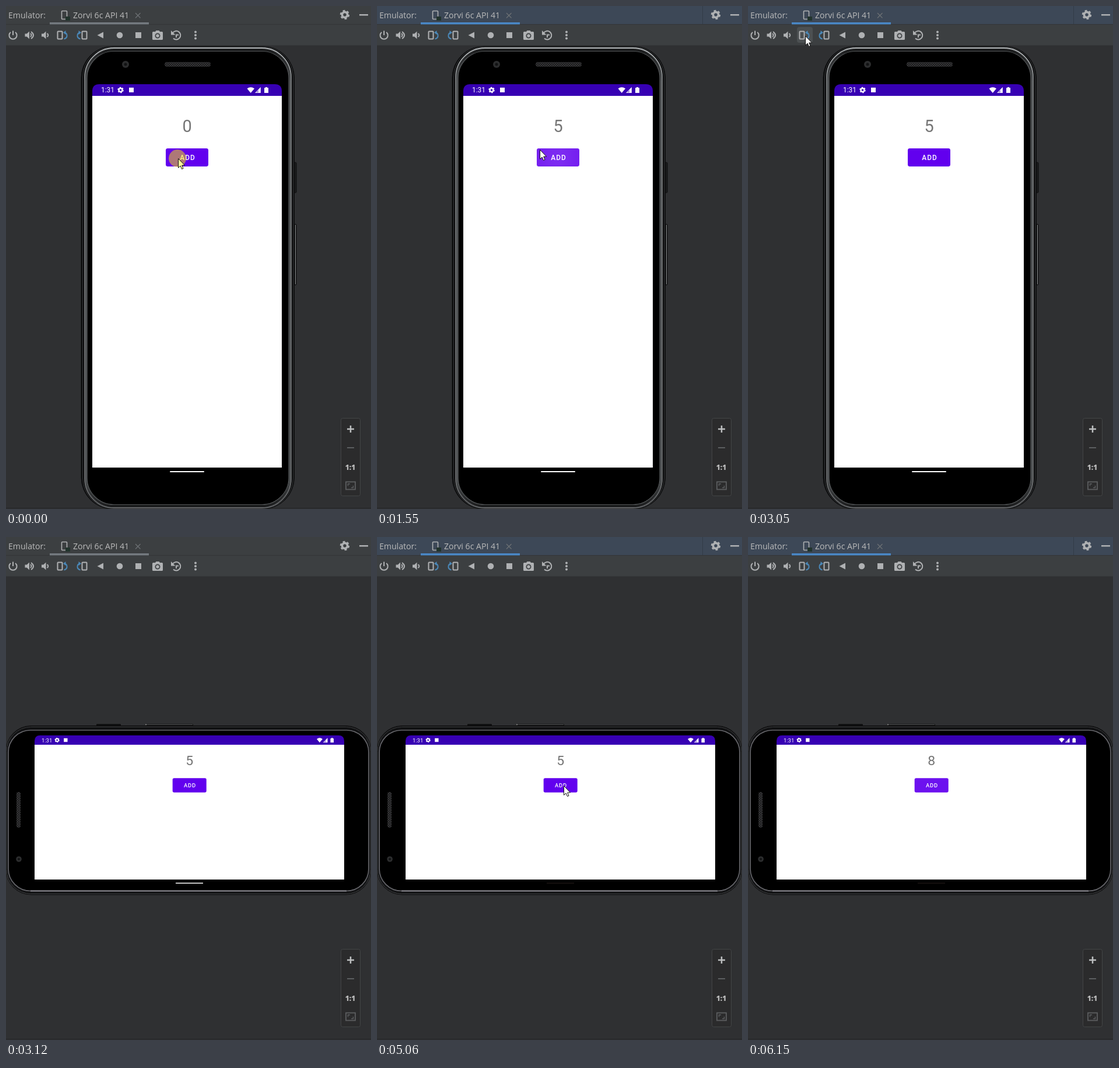
Animation of 626 by 862 pixels, one loop 6.34 s. Source, as an HTML page:

```html
<!DOCTYPE html>
<html lang="en">
<head>
<meta charset="utf-8">
<title>Counter app in an emulator</title>
<style>
  html, body { margin: 0; width: 100%; height: 100%; overflow: hidden; background: #2f3032; }
  svg { display: block; width: 626px; height: 862px; }
  .ui { font: 14.1px "Open Sans", "Noto Sans", sans-serif; fill: #bbb; }
  .app { font-family: Roboto, sans-serif; }
  .line { fill: none; stroke: #afb1b3; stroke-width: 2; }
  .blue { fill: none; stroke: #4a88b8; stroke-width: 2; }
  .icon { fill: #afb1b3; }
</style>
</head>
<body>
<svg viewBox="0 0 626 862">
  <defs>
    <g id="gear" fill="none" stroke="currentColor">
      <circle r="4.6" stroke-width="3.6"/>
      <circle r="6.9" stroke-width="2.6" stroke-dasharray="3.8 3.43"/>
    </g>
    <g id="leftIcons" fill="#fff">
      <text font-size="11.9">1:31</text>
      <use href="#gear" color="#fff" transform="translate(33.5 -4.3) scale(.64)"/>
      <rect x="48" y="-8.4" width="8" height="8"/>
    </g>
    <g id="rightIcons" fill="#fff">
      <path d="M-36.5-2.4Q-30.3-7.3-24-2.4L-30.3 5Z"/>
      <path d="M-13.2-5V5H-23Z"/>
      <path d="M-17-.6V4.3H-21.6Z" fill="#3700b3" opacity=".45"/>
      <path d="M-7-3.8H-5V-5H-2V-3.8H0V5H-7Z"/>
    </g>
    <g id="turn">
      <rect x="-8.5" y="-6.5" width="8" height="13" rx="1" class="line"/>
      <path d="M2.5 6.5Q8 5 7.5 0Q7-4 3.5-4.3" class="blue"/>
      <path d="M5.5-8V-.8L1-4.4Z" fill="#4a88b8"/>
    </g>
    <linearGradient id="metal" x1="0" y1="0" x2="0" y2="1">
      <stop offset="0" stop-color="#b4b8ba"/><stop offset=".07" stop-color="#7c7f81"/>
      <stop offset="1" stop-color="#66686a"/>
    </linearGradient>
    <linearGradient id="bevel" x1="0" y1="0" x2="0" y2="1">
      <stop offset="0" stop-color="#1c1d1e"/><stop offset=".07" stop-color="#4c4f51"/>
      <stop offset=".94" stop-color="#4c4f51"/><stop offset="1" stop-color="#1c1d1e"/>
    </linearGradient>
    <radialGradient id="glow" gradientUnits="userSpaceOnUse" cx="0" cy="44" r="42">
      <stop offset=".2" stop-color="#fff" stop-opacity=".62"/>
      <stop offset="1" stop-color="#fff" stop-opacity=".28"/>
    </radialGradient>
    <pattern id="mesh" width="4" height="4" patternUnits="userSpaceOnUse">
      <rect width="4" height="4" fill="#1a1a1b"/>
      <path d="M0 4L4 0M0 0L4 4" stroke="#3e3e3f" stroke-width=".8"/>
    </pattern>
  </defs>

  <rect width="626" height="862" fill="#2f3032"/>
  <rect y="860" width="626" height="1" fill="#252627"/>
  <g id="phones"></g>

  <!-- tool window header -->
  <rect width="626" height="67" fill="#3c3f41"/>
  <rect id="title" width="626" height="31"/>
  <path d="M0 31.5H626M0 67.5H626" stroke="#333537"/>
  <path id="split" d="M558.5 0V31" stroke="#333c47"/>
  <rect id="tabLine" x="75" y="28" width="170" height="3.5"/>
  <text x="4" y="21" class="ui">Emulator:</text>
  <text x="115" y="21" class="ui">Zorvi 6c API 41</text>
  <rect x="95.5" y="8.5" width="9" height="14" rx="1" class="line" style="stroke-width:1.6"/>
  <rect x="102" y="18" width="8" height="7" fill="#22342d"/>
  <path d="M222 12L230.5 20.5M230.5 12L222 20.5" stroke="#6e7275" stroke-width="1.2"/>
  <use href="#gear" color="#afb1b3" transform="translate(581 15)"/>
  <rect x="606" y="14" width="15" height="2.5" class="icon"/>

  <!-- toolbar -->
  <rect id="hover" y="36" width="27" height="27" rx="4" fill="#4c5052"/>
  <path d="M8 45A6.6 6.6 0 1 0 16 45M12 42.5V50" class="line"/>
  <g id="speakers"></g>
  <use href="#turn" x="97" y="50"/>
  <use href="#turn" transform="translate(130 50) scale(-1 1)"/>
  <path d="M156.5 50L167 44.5V55.5Z" class="icon"/>
  <circle cx="195" cy="50" r="5.3" class="icon"/>
  <rect x="222" y="45" width="10" height="10" class="icon"/>
  <path d="M252.5 44H256L257.500 42H262.5L264 44H267.5Q269 44 269 45.5V56.5Q269 58 267.5 58H252.5Q251 58 251 56.5V45.5Q251 44 252.5 44Z" class="icon"/>
  <circle cx="260" cy="51" r="3.6" fill="#afb1b3" stroke="#3c3f41" stroke-width="1.7"/>
  <path d="M286 46A7.3 7.3 0 1 1 287 55.5M292 54V49.5H296" class="line"/>
  <path d="M283 42V49.5H290.5Z" class="icon"/>
  <g class="icon"><circle cx="325" cy="44.5" r="2"/><circle cx="325" cy="50" r="2"/><circle cx="325" cy="55.5" r="2"/></g>

  <!-- zoom panel -->
  <rect x="574.5" y="706.5" width="33" height="133" rx="3" fill="#2b2b2c" stroke="#434546"/>
  <path d="M585 725H597M591 719V731" stroke="#bdbfc0" stroke-width="2.5"/>
  <path d="M585 757H597" stroke="#5c5e60" stroke-width="2"/>
  <text x="590.5" y="794.5" text-anchor="middle" class="ui" style="font-size:12px;font-weight:800">1:1</text>
  <g fill="none" stroke="#5c5e60"><rect x="583" y="815.5" width="16" height="13" stroke-width="1.8"/>
    <path d="M586.5 822.5V819H590M592 825.5H595.5V822" stroke-width="1.4"/></g>

  <g id="pointer">
    <circle id="spot" r="15" fill="rgb(250,240,0)" opacity=".5" cx="-1"/>
    <path id="arrow" d="M.5.5V16.3L4.1 13L6.5 18.5L9 17.4L6.7 12H11.6Z" stroke="#111"/>
  </g>
</svg>
<script>
const LOOP = 6340, STEP = 200 / 3, TURN = 3120;
const $ = id => document.getElementById(id);

// x, y, right, bottom, radius
const box = (x, y, r, b, rad, style) =>
  `<rect x="${x}" y="${y}" width="${r - x}" height="${b - y}" rx="${rad}" ${style}/>`;
const edge = (color, w = 1, fill = 'none') => `fill="${fill}" stroke="${color}" stroke-width="${w}"`;

function screen({ id, x, y, r, b, bar, k, cx, base, time, tray }) {
  const rad = 12 * k;
  const button = style => box(-36.5, 28.5, 36.5, 59.5, 3.4, style);
  return `<path d="M${x} ${b}V${y + rad}q0-${rad} ${rad}-${rad}H${r - rad}q${rad} 0 ${rad} ${rad}V${b}Z" fill="#3700b3"/>
    <rect x="${x}" y="${y + bar}" width="${r - x}" height="${b - y - bar}" fill="#fff"/>
    <g class="app">
      <use href="#leftIcons" transform="translate(${time}) scale(${k})"/>
      <use href="#rightIcons" transform="translate(${tray}) scale(${k})"/>
      <g transform="translate(${cx} ${base}) scale(${k})" text-anchor="middle">
        <text id="${id}Count" font-size="28.9" fill="#757575">0</text>
        ${button('fill="#6200ee"')}
        ${button(`id="${id}Focus" fill="#fff"`)}
        ${button(`id="${id}Glow" fill="url(#glow)"`)}
        <text x="1" y="48.3" font-size="11.9" font-weight="500" letter-spacing="1.06" fill="#fff">ADD</text>
      </g>
    </g>`;
}

const tall = box(494, 268, 498, 320, 1.5, edge('#0c0c0d', 1, '#1a1b1c'))
  + box(494, 374, 498, 478, 1.5, edge('#0c0c0d', 1, '#1a1b1c'))
  + '<path d="M496.5 375V477" stroke="#85888a"/>'
  + box(129, 69, 494.5, 862, 54, edge('#111213', 1, '#080809'))
  + box(131.5, 70, 492.5, 861, 52, edge('#3c3e40'))
  + box(137, 74.5, 487.5, 857.5, 48, edge('url(#bevel)', 4, '#000'))
  + box(135, 72, 489, 860, 50, edge('url(#metal)', 1.8))
  + box(139, 77.5, 485, 854.5, 46, edge('#5a5d5f', 1.2))
  + box(272, 96, 351, 104, 4, 'fill="url(#mesh)"')
  + '<circle cx="205" cy="100" r="6" fill="#2c2d2e"/><circle cx="205" cy="100" r="2.5" fill="#121314"/>'
  + box(281, 797, 340, 799, 1, 'fill="#fff"')
  + screen({ id: 'p', x: 148, y: 134, r: 473, b: 791, bar: 20, k: 1, cx: 310.5, base: 215.5,
             time: '163 148.3', tray: '450 144' });

const wide = box(155, 320.5, 197, 324, 1, 'fill="#0c0c0d"')
  + box(239, 320.5, 321, 324, 1, 'fill="#111"') + '<path d="M240 321.5H320" stroke="#4a4c4e"/>'
  + '<circle cx="240" cy="321.5" r="1" fill="#999"/>'
  + box(0, 323.5, 626, 613, 43, edge('#151516', 1, '#080809'))
  + box(.8, 325.5, 625.2, 611.5, 42, edge('#47494b'))
  + box(2.5, 328, 623.5, 609, 40, edge('#17181a', 1.5))
  + box(4, 331, 622, 606.5, 38, edge('#6a6a6f', 1.6, '#000'))
  + '<path d="M42 606.5H584" stroke="#77767c" stroke-width="2.4"/>'
  + box(18, 437, 25, 498, 3, 'fill="url(#mesh)"')
  + '<circle cx="22" cy="552" r="4.8" fill="#2c2d2e"/><circle cx="22" cy="552" r="2" fill="#121314"/>'
  + '<rect id="handle" x="291" y="592.5" width="47" height="1.5"/>'
  + screen({ id: 'l', x: 49, y: 340, r: 580, b: 587, bar: 16, k: .795, cx: 314.7, base: 390.5,
             time: '61 351.5', tray: '562 348.2' });

$('phones').innerHTML = `<g id="p">${tall}</g><g id="l">${wide}</g>`;

const speaker = (x, waves) => `<g transform="translate(${x} 50)">
  <path d="M0-2.5H3.2L7.5-6.5V6.5L3.2 2.5H0Z" class="icon"/><path d="${waves}" class="line"/></g>`;
$('speakers').innerHTML = speaker(32.5, 'M9.5-3Q12.5 0 9.5 3M10.5-6Q18.5 0 10.5 6') + speaker(61, 'M9.5-3Q13 0 9.5 3');

// time, x, y of the pointer tip
const PATH = [
  [0, 295, 261], [1470, 295, 261], [1700, 238, 206], [2000, 152, 119], [2200, 151, 83], [2400, 150, 59],
  [2667, 131, 51], [2800, 98, 51], [3120, 98, 51], [3825, -9, 343], [3933, 2, 344],
  [4067, 46, 343], [4333, 175, 408], [4533, 300, 452], [4667, 322, 438], [4867, 320, 426],
  [5700, 320, 426], [5900, 185, 420], [6133, 2, 429]
];
const TAPS = [[0, 130], [270, 400], [500, 640], [740, 880], [1000, 1140],
              [5070, 5200], [5270, 5400], [5460, 5600]];
const ROTATE = [2980, 3050];

function tipAt(t) {
  const i = PATH.findIndex(p => p[0] > t);
  if (i < 0) return PATH.at(-1).slice(1);
  const [a, ax, ay] = PATH[i - 1], [b, bx, by] = PATH[i];
  const f = (t - a) / (b - a);
  return [Math.round(ax + (bx - ax) * f), Math.round(ay + (by - ay) * f)];
}

const within = (t, a, b) => t >= a && t < b;
const show = (id, on) => { $(id).style.display = on ? '' : 'none'; };

const glowAt = t => Math.max(0, ...TAPS.map(([a, b]) =>
  t < a ? 0 : Math.min((t - a) / 120, 1, 1 - (t - b) / 480)));

function draw(t) {
  const tick = Math.floor((t + 20) / STEP) * STEP;
  const flat = t >= TURN, id = flat ? 'l' : 'p';
  const active = within(t, 60, TURN) || t >= 5000;
  show('p', !flat);
  show('l', flat);
  $('title').setAttribute('fill', active ? '#3d4857' : '#3c3f41');
  $('tabLine').setAttribute('fill', active ? '#4a88c7' : '#747a80');
  show('split', active);

  $(id + 'Count').textContent = TAPS.filter(([, up]) => t >= up).length;
  $(id + 'Glow').setAttribute('opacity', glowAt(tick).toFixed(3));
  $(id + 'Focus').setAttribute('opacity', within(t, 130, 2650) || t >= 5200 ? .065 : 0);

  const fade = [3290, 3420, 3620, 3830].filter(a => t >= a).length;
  $('handle').setAttribute('fill', ['#fff', '#b0adab', '#6b6765', '#3a3533', '#1b1513'][fade]);

  const overLeft = within(t, 2720, TURN), overRight = within(t, 2590, 2720);
  show('hover', overLeft || overRight);
  $('hover').setAttribute('x', overLeft ? 84 : 116.5);

  const down = [...TAPS, ROTATE].some(([a, b]) => within(t, a, b));
  const [x, y] = tipAt(tick);
  show('pointer', !within(t, TURN, 3830) && t < 6150);
  $('pointer').setAttribute('transform', `translate(${x} ${y})`);
  show('spot', down);
  $('arrow').setAttribute('fill', down ? '#fdf89a' : '#fff');
}

const start = performance.now();
function frame() {
  draw((performance.now() - start) % LOOP);
  requestAnimationFrame(frame);
}
draw(0);
requestAnimationFrame(frame);
</script>
</body>
</html>
```
